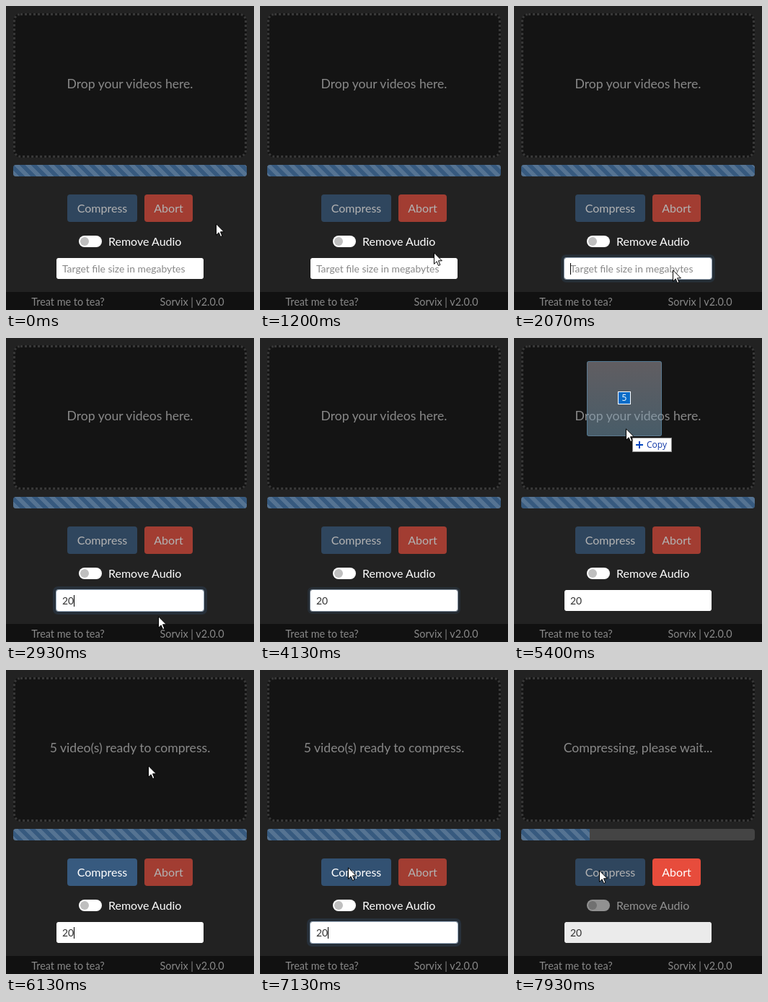
Recreate the animation shown at these times as an HTML page. Size 344 by 421 pixels, loop 8000 ms.

```html
<!DOCTYPE html>
<html lang="en">
<head>
<meta charset="utf-8">
<title>Video compressor</title>
<style>
  html, body { margin: 0; width: 100%; height: 100%; overflow: hidden; background: #222; }
  body { position: relative; font: 16px Lato, sans-serif; color: #fff; }
  body * { position: absolute; box-sizing: border-box; white-space: pre; }
  #zone { left: 10px; top: 10px; width: 324px; height: 200px; border: 3px dotted #383838; border-radius: 10px; background: #141414; }
  #message { left: 0; top: 96px; width: 344px; text-align: center; font-size: 17.6px; line-height: 24px; color: #888; }
  #track { left: 10px; top: 220px; width: 324px; height: 16px; border-radius: 4px; background: #444; overflow: hidden; }
  #bar {
    height: 16px; background: #375a7f linear-gradient(45deg, #ffffff26 25%, transparent 25%, transparent 50%,
      #ffffff26 50%, #ffffff26 75%, transparent 75%) 0 0 / 16px 16px;
  }
  .button { top: 261px; height: 38px; line-height: 38px; border-radius: 4px; text-align: center; }
  #compress { left: 85px; width: 97px; }
  #abort { left: 192px; width: 67px; background: #e74c3c; }
  #option { left: 101px; top: 318px; width: 150px; height: 16px; }
  #switch { left: 0; top: 0; width: 32px; height: 16px; border-radius: 8px; background: #fff; }
  #knob { left: 2px; top: 2px; width: 12px; height: 12px; border-radius: 50%; background: #bfbfbf; }
  #label { left: 41px; top: -4px; line-height: 24px; }
  #field { left: 69px; top: 348px; width: 206px; height: 31px; border: 1px solid #222; border-radius: 3.2px; background-clip: padding-box; }
  #value { left: 8px; top: 4px; font-size: 13.9px; line-height: 21px; }
  #caret { top: 7px; width: 1px; height: 16px; background: #000; }
  #footer { left: 0; top: 396px; width: 344px; height: 25px; background: #111; overflow: hidden; }
  #footer div { top: 0; width: 172px; text-align: center; font-size: 14.4px; line-height: 27px; color: #888; }
  #pointer { left: 0; top: 0; }
  #drag { left: -54px; top: -93px; width: 104px; height: 104px; border: 1px solid #5a96be80; border-radius: 3px;
    background: linear-gradient(#aca6ae80, #7ca4bc80); }
  #badge { left: 42px; top: 41px; width: 18px; height: 18px; border: 1px solid #fff; background: #0a6cc8;
    font: 12px/16px "Open Sans", sans-serif; text-align: center; }
  #tip { left: 9px; top: 13px; width: 55px; height: 20px; border: 1px solid #888; background: #fff;
    font: 12px/18px "Open Sans", sans-serif; color: #1038a8; }
  #tip span { left: 19px; top: 0; }
  #tip i { background: #0046c0; }
  #arrow { left: 0; top: 0; overflow: visible; }
</style>
</head>
<body>
<div id="zone"></div>
<div id="message"></div>
<div id="track"><div id="bar"></div></div>
<div class="button" id="compress">Compress</div>
<div class="button" id="abort">Abort</div>
<div id="option">
  <div id="switch"><div id="knob"></div></div>
  <div id="label">Remove Audio</div>
</div>
<div id="field"><div id="value"></div><div id="caret"></div></div>
<div id="footer">
  <div style="left:0">Treat me to tea?</div>
  <div style="left:172px">Sorvix | v2.0.0</div>
</div>
<div id="pointer">
  <div id="drag"><div id="badge">5</div></div>
  <div id="tip">
    <i style="left:4px;top:8px;width:10px;height:2px"></i>
    <i style="left:8px;top:4px;width:2px;height:10px"></i>
    <span>Copy</span>
  </div>
  <svg id="arrow" width="14" height="21">
    <path d="M.5.8V16.3L4.1 12.8 6.6 18.5 8.9 17.5 6.5 11.8H11.4Z" fill="#fff" stroke="#000"/>
  </svg>
</div>
<script>
const LOOP = 8000;
const FOCUS = 1950, TYPE_2 = 2420, TYPE_0 = 2670, LEAVE = 3900, BLUR = 4080;
const DRAG = 4450, DROP = 6130, HOVER = 7040, PRESS = 7600, START = 7681;

// Pointer tip: time, x, y
const path = [
  [0, 291, 301], [800, 290, 304], [1000, 262, 322], [1200, 241, 341], [1700, 236, 346],
  [1950, 222, 364], [2200, 218, 366], [2500, 211, 385], [3500, 211, 385], [3700, 190, 392],
  [LEAVE, 14, 206], [DRAG, -40, 120], [4700, 60, 108], [5200, 150, 116], [5400, 155, 125],
  [DROP, 197, 132], [6400, 196, 140], [7000, 125, 270], [7300, 118, 277], [LOOP, 118, 277]
];

const el = id => document.getElementById(id);
const show = (id, on) => { el(id).style.display = on ? '' : 'none'; };
const clamp = v => Math.min(1, Math.max(0, v));
const within = (t, a, b) => t >= a && t < b;

function bezier(x, x1, y1, x2, y2) {
  const at = (s, a, b) => 3 * s * (1 - s) ** 2 * a + 3 * s * s * (1 - s) * b + s ** 3;
  let low = 0, high = 1;
  for (let i = 0; i < 24; i++) {
    const mid = (low + high) / 2;
    if (at(mid, x1, x2) < x) low = mid; else high = mid;
  }
  return at(low, y1, y2);
}
const ramp = (t, start) => bezier(clamp((t - start) / 150), .42, 0, .58, 1);
const mix = (a, b, p) => `color-mix(in srgb, ${b} ${p * 100}%, ${a})`;

function pointerAt(t) {
  const i = path.findIndex(key => key[0] > t);
  const [t0, x0, y0] = path[i - 1], [t1, x1, y1] = path[i];
  const p = (t - t0) / (t1 - t0);
  return [Math.round(x0 + (x1 - x0) * p), Math.round(y0 + (y1 - y0) * p)];
}

function drawField(t, busy) {
  const text = t < TYPE_2 ? '' : t < TYPE_0 ? '2' : '20';
  const ring = ramp(t, FOCUS) - ramp(t, BLUR) + ramp(t, DROP) - ramp(t, PRESS);
  const field = el('field').style;
  field.backgroundColor = busy ? '#ebebeb' : '#fff';
  field.borderColor = mix('#222', '#9badbf', ring);
  field.boxShadow = `0 0 0 ${4 * ring}px rgba(55, 90, 127, ${.25 * ring})`;
  el('value').textContent = text || 'Target file size in megabytes';
  el('value').style.color = text ? '#303030' : '#888';

  const lastEdit = [DROP, TYPE_0, TYPE_2, FOCUS].find(time => time <= t);
  const focused = within(t, FOCUS, BLUR) || within(t, DROP, PRESS);
  show('caret', focused && (t - lastEdit) % 1000 < 500);
  el('caret').style.left = 8 + Math.round(text.length * 8.12) + 'px';
}

function draw(t) {
  const busy = t >= START;
  const dragging = within(t, DRAG, DROP);
  el('message').textContent = busy ? 'Compressing, please wait...'
    : t >= DROP ? '5 video(s) ready to compress.' : 'Drop your videos here.';

  el('bar').style.width = 324 * (1 - bezier(clamp((t - START) / 600), .25, .1, .25, 1)) + 'px';
  el('bar').style.backgroundPositionX = 16 * (1 - t % 1000 / 1000) + 'px';

  el('compress').style.opacity = within(t, DROP, START) ? 1 : .65;
  el('compress').style.background = mix('#375a7f', '#2f4d6c', ramp(t, HOVER) - ramp(t, START));
  el('abort').style.opacity = busy ? 1 : .65;
  el('option').style.opacity = busy ? .5 : 1;
  drawField(t, busy);

  const [x, y] = pointerAt(t);
  el('pointer').style.transform = `translate(${x}px, ${y}px)`;
  show('pointer', !within(t, LEAVE, DRAG));
  show('drag', dragging);
  show('tip', dragging);
}

const begin = performance.now();
function tick() {
  draw((performance.now() - begin) % LOOP);
  requestAnimationFrame(tick);
}
tick();
</script>
</body>
</html>
```
